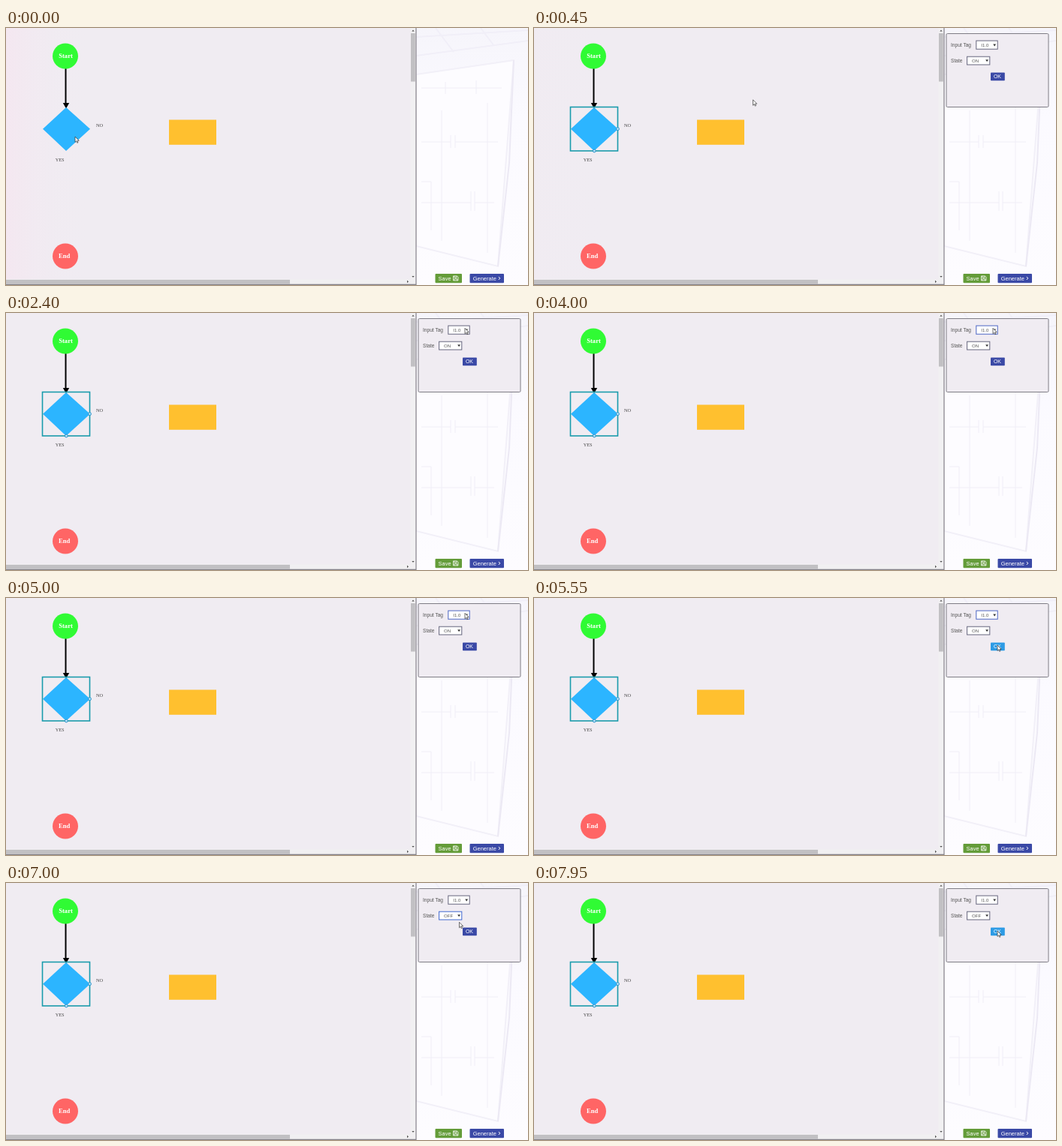
Recreate the animation shown at these times as an HTML page. Size 695x343 px, loop 8 s.

```html
<!DOCTYPE html>
<html lang="en">
<head>
<meta charset="utf-8">
<title>Flowchart editor</title>
<style>
  html, body { margin: 0; width: 100%; height: 100%; overflow: hidden; background: #fbfaff; }
  svg { display: block; width: 100%; height: 100%; }
  text { font-family: "Liberation Sans", Arial, sans-serif; }
  .serif { font-family: "Liberation Serif", "Times New Roman", serif; }
  .node { font-size: 8.6px; font-weight: bold; fill: #fff; text-anchor: middle; }
  .branch { font-size: 6.3px; fill: #444; }
  .label { font-size: 6.6px; fill: #555; }
  .value { font-size: 6.1px; fill: #555; }
  .btn { font-size: 7.5px; fill: #fff; }
  .select { fill: #fff; stroke-width: 1; }
</style>
</head>
<body>
<svg viewBox="0 0 695 343" preserveAspectRatio="none">
  <defs>
    <linearGradient id="tint">
      <stop offset="0" stop-color="#f5e6f0"/>
      <stop offset="1" stop-color="#f0ecf2" stop-opacity="0"/>
    </linearGradient>
    <linearGradient id="wall" x2="0" y2="1">
      <stop offset="0" stop-color="#f6f5fb"/>
      <stop offset=".35" stop-color="#fbfaff"/>
      <stop offset="1" stop-color="#fdfcff"/>
    </linearGradient>
  </defs>

  <!-- backdrop on the right -->
  <rect x="546" width="149" height="343" fill="url(#wall)"/>
  <g fill="none" stroke="#f1eff8">
    <path d="M546 12 695 3M546 37 695 17M572 0 596 32M632 0 650 24" stroke-width="2"/>
    <path d="M546 62 676 43 655 318 546 291Z" fill="#fdfcff" stroke="#f2f0f8" stroke-width="2"/>
    <path d="M676 43 670 180 655 318" stroke="#ece9f4" stroke-width="2"/>
    <path d="M553 80H585V72M585 88V80H626V70M626 88V80H660M553 152H592M592 143V160M598 143V160M598 152H655
             M553 233H619M619 218V244M624 218V244M624 233H650M553 205H566V270M580 110V284M641 100V300" stroke="#f0eef7"/>
  </g>

  <!-- canvas pane -->
  <rect width="546" height="343" fill="#f0ecf2"/>
  <rect id="wash" width="110" height="335" fill="url(#tint)"/>
  <path d="M79.5 54V101" stroke="#000" stroke-width="2"/>
  <path d="M75.8 100H84.2L80 107.5Z"/>
  <circle cx="79" cy="37.5" r="17" fill="#30fb34"/>
  <text class="serif node" x="79.5" y="40">Start</text>
  <circle cx="79" cy="304.5" r="17" fill="#ff6565"/>
  <text class="serif node" x="77.7" y="307">End</text>
  <path d="M80 106 112 134.7 80 164 49 134.7Z" fill="#2cb5ff"/>
  <rect x="217" y="122.5" width="63" height="33.3" fill="#ffc02f"/>
  <text class="serif branch" x="120" y="132">NO</text>
  <text class="serif branch" x="65.7" y="178">YES</text>
  <g id="selection" stroke="#199bac" fill="none">
    <rect x="48.5" y="105.5" width="63" height="58.5" stroke-width="1.6"/>
    <circle cx="111.5" cy="134.7" r="1.9" fill="#bfe6fa" stroke="#2590c8"/>
    <circle cx="80.3" cy="164" r="1.9" fill="#bfe6fa" stroke="#2590c8"/>
  </g>

  <!-- scrollbars -->
  <rect x="538.5" width="7" height="343" fill="#f1f0f2"/>
  <rect y="335.5" width="538.5" height="6.5" fill="#f1f0f2"/>
  <rect x="539" y="7" width="5.8" height="64.5" fill="#c1c0c3"/>
  <rect y="336" width="378" height="5.5" fill="#c1c0c3"/>
  <path d="M540.3 4.5H543.7L542 2.5ZM540.3 331H543.7L542 333ZM534 336.8V340.2L536 338.5Z" fill="#555"/>
  <path d="M546 0V343M0 342.4H546" stroke="#85838a" stroke-width="1.2"/>

  <!-- footer buttons -->
  <rect x="571.5" y="328" width="35.5" height="12.3" rx="1" fill="#649c39"/>
  <text class="btn" x="575.6" y="336.7">Save</text>
  <path d="M595.5 331H600.5L602 332.5V337H595.5ZM597 331V333.2H600V331M597 337V334.8H600.5V337" fill="none" stroke="#fff" stroke-width=".8"/>
  <rect x="617.5" y="328" width="45.5" height="12.3" rx="1" fill="#3a49a6"/>
  <text class="btn" x="621.7" y="336.7">Generate</text>
  <path d="M655.8 332 657.8 334 655.8 336" fill="none" stroke="#fff"/>

  <!-- property panel -->
  <g id="panel">
    <rect x="549" y="7.5" width="136" height="98" rx="1.5" fill="#f0ecf2" stroke="#7e7c84"/>
    <text class="label" x="555" y="25">Input Tag</text>
    <rect id="tag" class="select" x="588.8" y="17" width="28.4" height="11.2"/>
    <text class="value" x="595.3" y="25">I1.0</text>
    <path d="M611.3 21.6H615.1L613.2 24.4Z" fill="#333"/>
    <text class="label" x="555" y="46">State</text>
    <rect id="state" class="select" x="576.6" y="38.2" width="30.2" height="10.8"/>
    <text id="stateText" class="value" x="583" y="46">ON</text>
    <path d="M601.2 42.2H605L603.1 45Z" fill="#333"/>
    <rect id="ok" x="608" y="59.5" width="18.8" height="10.7" rx=".8"/>
    <text class="btn" x="611.9" y="67.3" font-size="7" style="font-size:7px">OK</text>
  </g>

  <path id="cursor" d="M0 0V7.4L1.7 5.8 2.8 8.3 4 7.8 2.9 5.3H5.2Z" fill="#fff" stroke="#333" stroke-width=".7"/>
</svg>
<script>
const LOOP = 8000;
const $ = id => document.getElementById(id);
const set = (id, name, value) => $(id).setAttribute(name, value);
const clamp = v => Math.max(0, Math.min(1, v));
const ramp = (t, from, to) => clamp((t - from) / (to - from));
const ease = p => p * p * (3 - 2 * p);
const show = (id, on) => set(id, "visibility", on ? "visible" : "hidden");

// time, x, y of the pointer tip
const path = [
  [0, 92, 145], [200, 92, 145], [820, 648, 8], [850, 650, -12],
  [1650, 646, -12], [1700, 646, -2], [1750, 646, -12],
  [1900, 642, -6], [2350, 611, 20.3], [5000, 611, 20.3],
  [5250, 617, 63], [5850, 617, 63], [6150, 602.3, 45.3],
  [6600, 602.3, 45.3], [6850, 603.5, 52.3], [7350, 603.5, 52.3],
  [7600, 617, 64]
];

function pointer(t) {
  const i = path.findIndex(k => k[0] > t);
  if (i < 0) return path[path.length - 1].slice(1);
  const [a, b] = [path[i - 1], path[i]];
  const p = ease(ramp(t, a[0], b[0]));
  return [a[1] + (b[1] - a[1]) * p, a[2] + (b[2] - a[2]) * p];
}

function mix(a, b, p) {
  return `rgb(${a.map((v, i) => Math.round(v + (b[i] - v) * p))})`;
}

function draw(t) {
  const open = t >= 100;
  show("selection", open);
  show("panel", open);
  set("wash", "opacity", 0.8 * (1 - ramp(t, 50, 500)));

  const tagFocus = t >= 2900 && t < 5850;
  const stateFocus = t >= 6150 && t < 7800;
  set("tag", "stroke", tagFocus ? "#4c66c4" : "#66667e");
  set("state", "stroke", stateFocus ? "#4168d0" : "#66667e");
  $("stateText").textContent = t < 6600 ? "ON" : "OFF";

  const hover = ramp(t, 5200, 5500) * (1 - ramp(t, 5900, 6100)) + ramp(t, 7500, 7900);
  set("ok", "fill", mix([58, 73, 166], [45, 155, 229], hover));

  const [x, y] = pointer(t);
  set("cursor", "transform", `translate(${x.toFixed(2)} ${y.toFixed(2)})`);
}

const start = performance.now();
function tick(now) {
  draw(Math.max(0, now - start) % LOOP);
  requestAnimationFrame(tick);
}
draw(0);
requestAnimationFrame(tick);
</script>
</body>
</html>
```
